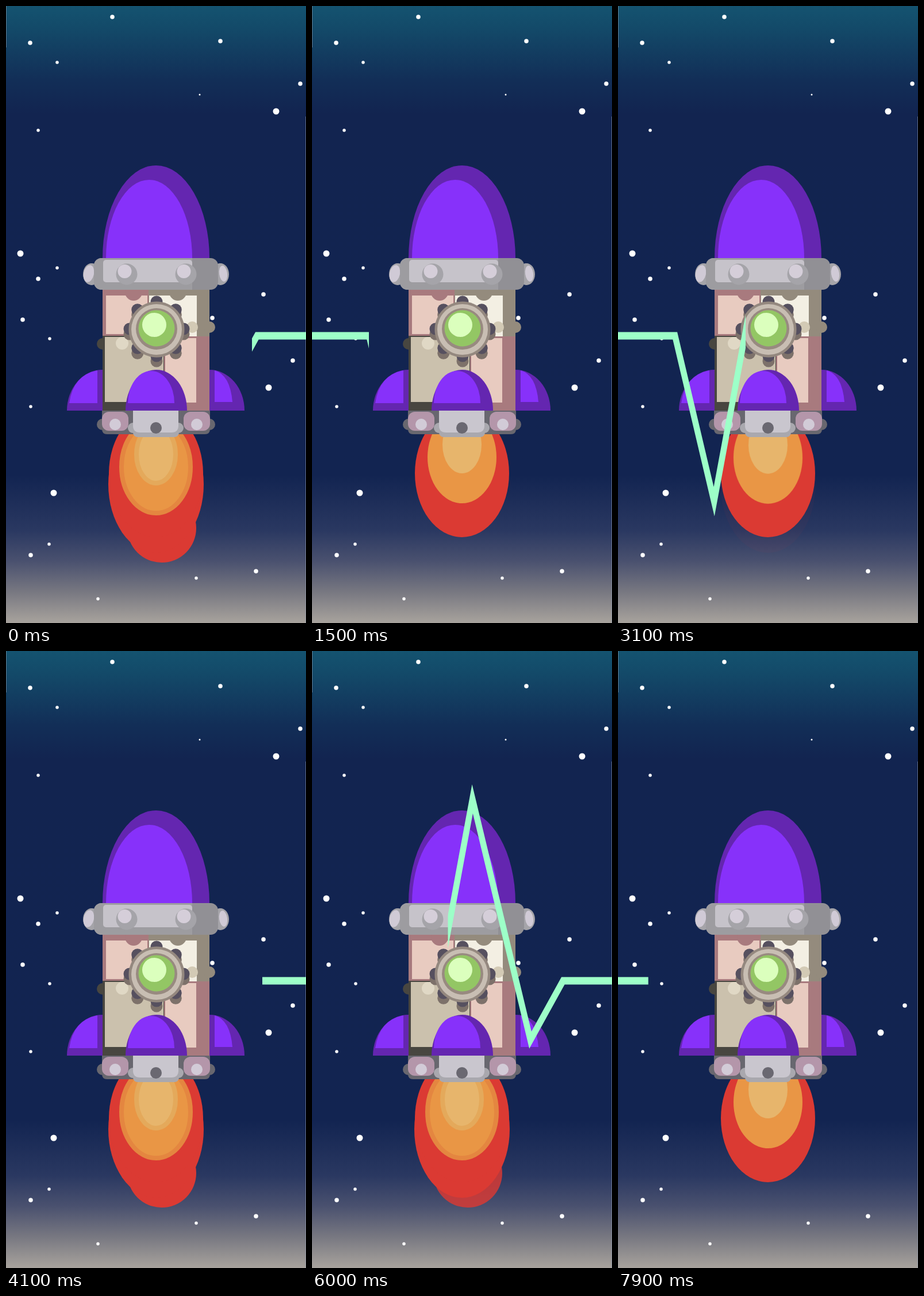
Write an HTML page that moves like this. It is 522 by 1072 pixels and loops after 8 s.

```html
<!DOCTYPE html>
<html lang="en">
<head>
<meta charset="utf-8">
<title>Rocket pulse</title>
<style>
  html, body { margin: 0; width: 100%; height: 100%; overflow: hidden; background: #122450; }
  svg { display: block; width: 100%; height: 100%; }
</style>
</head>
<body>
<svg viewBox="0 0 522 1072" preserveAspectRatio="none">
  <defs>
    <linearGradient id="sky" x2="0" y2="1">
      <stop offset="0" stop-color="#145370"/>
      <stop offset=".035" stop-color="#134a69"/>
      <stop offset=".12" stop-color="#122e57"/>
      <stop offset=".175" stop-color="#122450"/>
      <stop offset=".76" stop-color="#122451"/>
      <stop offset=".85" stop-color="#2a3861"/>
      <stop offset=".9" stop-color="#4a516f"/>
      <stop offset=".95" stop-color="#787881"/>
      <stop offset="1" stop-color="#a8a39d"/>
    </linearGradient>
    <clipPath id="window"><rect id="wipe" y="0" height="1072"/></clipPath>
  </defs>
  <rect width="522" height="1072" fill="url(#sky)"/>
  <path d="M.5 0V72M521.500 192V1072" stroke="#8d97a8" opacity=".6"/>

  <!-- stars: small, medium, large -->
  <g stroke="#fff" stroke-linecap="round">
    <path stroke-width="5.500" d="M89 98h0M56 216h0M89 455h0M76 578h0M43 696h0M75 935h0M331 994h0M160 1030h0"/>
    <path stroke-width="7.500" d="M185 19h0M42 64h0M373 61h0M512 135h0M56 474h0M29 545h0M448 501h0M359 542h0M499 616h0M43 954h0M435 982h0"/>
    <path stroke-width="11" d="M470 183h0M25 430h0M457 663h0M83 846h0"/>
    <path stroke-width="3" d="M337 154h0"/>
  </g>

  <g fill="#db3a33">
    <circle id="ember" cx="271" cy="907" r="60"/>
    <ellipse id="glow" cx="261" cy="831" rx="83" ry="119"/>
    <ellipse cx="261" cy="812" rx="82" ry="111"/>
  </g>
  <g id="core">
    <ellipse cx="261" cy="784" rx="60" ry="80" fill="#e99645" stroke="#e48640"/>
    <ellipse cx="261" cy="762" rx="34" ry="50" fill="#e7b56c" stroke="#e4a95b"/>
  </g>

  <!-- nose -->
  <path d="M168 438A93 161 0 0 1 354 438Z" fill="#6426b0"/>
  <path d="M174 438A75 136 0 0 1 324 438Z" fill="#8731fa"/>

  <!-- body panels -->
  <path d="M168 493H248V573H168ZM275 574H354V703H210V688H275Z" fill="#a87a7e"/>
  <path d="M248 493H354V574H248Z" fill="#948b7d"/>
  <path d="M168 573H275V688H210V703H168Z" fill="#484640"/>
  <path d="M174 503H246V570H174ZM277 577H331V689H277Z" fill="#e8cbc0"/>
  <path d="M249 503H332V574H249Z" fill="#f3efe3"/>
  <path d="M172 575H274V688H172Z" fill="#cbc1ad"/>
  <circle cx="222" cy="497" r="15" fill="#a87a7e"/>
  <circle cx="299" cy="497" r="15" fill="#948b7d"/>
  <path d="M168 577a10 10 0 0 0 0 20Z" fill="#484640"/>
  <circle cx="202" cy="586" r="11" fill="#e0d8c5"/>
  <circle cx="354" cy="558" r="10" fill="#948b7d"/>
  <circle cx="324" cy="558" r="10" fill="#d3cab5"/>

  <!-- collar -->
  <g fill="#a5a4a9"><ellipse cx="149" cy="466" rx="15" ry="19"/><ellipse cx="373" cy="466" rx="15" ry="19"/></g>
  <ellipse cx="144" cy="465" rx="9" ry="15" fill="#d0cad6" transform="rotate(12 144 465)"/>
  <ellipse cx="378" cy="465" rx="7" ry="14" fill="#d0cad6" transform="rotate(-8 378 465)"/>
  <rect x="153" y="438" width="216" height="55" rx="13" fill="#919095"/>
  <path d="M166 438H324V493H166A13 13 0 0 1 153 480V451A13 13 0 0 1 166 438" fill="#9d9ca0"/>
  <rect x="169" y="441" width="155" height="39" rx="5" fill="#c6c3ca"/>
  <g fill="#a5a4a9"><circle cx="210" cy="466" r="18.500"/><circle cx="313" cy="466" r="18.500"/></g>
  <g fill="#d5ced9"><circle cx="206.500" cy="461" r="12"/><circle cx="309.500" cy="461" r="12"/></g>

  <!-- porthole -->
  <g id="shadows" fill="#7d716a" transform="translate(0 9)"></g>
  <g id="rivets" fill="#56505f"></g>
  <g>
    <circle cx="262" cy="562" r="48.500" fill="#94887f"/>
    <circle cx="262" cy="562" r="44" fill="#c8beb3"/>
    <circle cx="262" cy="561" r="36" fill="#988a80"/>
    <circle cx="262" cy="560" r="31.500" fill="#93c664"/>
    <circle cx="258" cy="554" r="21" fill="#dbffbd"/>
  </g>

  <!-- base -->
  <g fill="#68676f">
    <circle cx="168" cy="727" r="10"/><circle cx="354" cy="727" r="10"/>
    <path d="M167 703H355V735Q355 744 346 744H176Q167 744 167 735Z"/>
  </g>
  <g fill="#b496aa">
    <rect x="167" y="705" width="46" height="33" rx="12"/>
    <rect x="309" y="705" width="46" height="33" rx="12"/>
  </g>
  <g fill="#d2cbd7"><circle cx="190" cy="727" r="10"/><circle cx="332" cy="727" r="10"/></g>
  <g fill="#a9a8ae">
    <rect x="212" y="724" width="97" height="18" rx="9"/>
    <rect x="221" y="728" width="80" height="21" rx="8"/>
  </g>
  <path d="M221 703H300V729Q300 741 288 741H233Q221 741 221 729Z" fill="#c9c6ce"/>
  <circle cx="261" cy="733" r="10" fill="#6a6871"/>

  <!-- fins -->
  <g fill="#6426b0">
    <path d="M106 703A62 71 0 0 1 168 632V703Z"/>
    <path d="M354 632A61 71 0 0 1 415 703H354Z"/>
    <path d="M208 703A53.500 71 0 0 1 315 703Z"/>
  </g>
  <g fill="#8731fa">
    <path d="M110 690Q117 641 159 633V690Z"/>
    <path d="M363 633Q390 641 394 688H363Z"/>
    <path d="M212 690A40.500 56 0 0 1 293 690Z"/>
  </g>

  <g clip-path="url(#window)">
    <polyline transform="scale(.8 1)" points="0,573 124,573 209,861 349,257 475,676 546,573 653,573"
      fill="none" stroke="#9dffc8" stroke-width="13" stroke-miterlimit="12"/>
  </g>
</svg>
<script>
const LOOP = 8000, STEP = 100, WIDTH = 522;
// Start and duration of each heartbeat; a new one cuts off the last.
const BEATS = [[-1516, 1860], [1254, 1293], [2547, 1860], [4237, 2687], [7647, 1860]];
const $ = id => document.getElementById(id);

function addRing(parent) {
  for (let i = 0; i < 8; i++) {
    const angle = i * Math.PI / 4;
    const dot = document.createElementNS(parent.namespaceURI, 'circle');
    dot.setAttribute('cx', 262 + 47 * Math.cos(angle));
    dot.setAttribute('cy', 561 + 47 * Math.sin(angle));
    dot.setAttribute('r', 10.5);
    parent.append(dot);
  }
}
addRing($('shadows'));
addRing($('rivets'));

function smooth(from, to, value) {
  const k = Math.min(1, Math.max(0, (value - from) / (to - from)));
  return k * k * (3 - 2 * k);
}

function draw(time) {
  const [start, duration] = BEATS.findLast(beat => beat[0] <= time);
  const progress = (time - start) / duration;

  // The line is first drawn across the stage, then wiped away behind.
  const reach = 2 * WIDTH * smooth(0, 1, progress);
  const left = Math.max(0, reach - WIDTH);
  $('wipe').setAttribute('x', left);
  $('wipe').setAttribute('width', Math.min(WIDTH, reach) - left);

  const fade = 1 - smooth(.95, 1.2, progress);
  const power = smooth(.25, .65, progress) * fade;
  $('core').setAttribute('transform', `translate(0 ${17 * power})`);
  $('core').setAttribute('stroke-width', 8 * power);
  $('glow').setAttribute('opacity', power);
  $('ember').setAttribute('opacity', smooth(.4, .75, progress) * fade);
}

function tick() {
  draw(Math.floor(performance.now() % LOOP / STEP) * STEP);
  requestAnimationFrame(tick);
}
tick();
</script>
</body>
</html>
```
